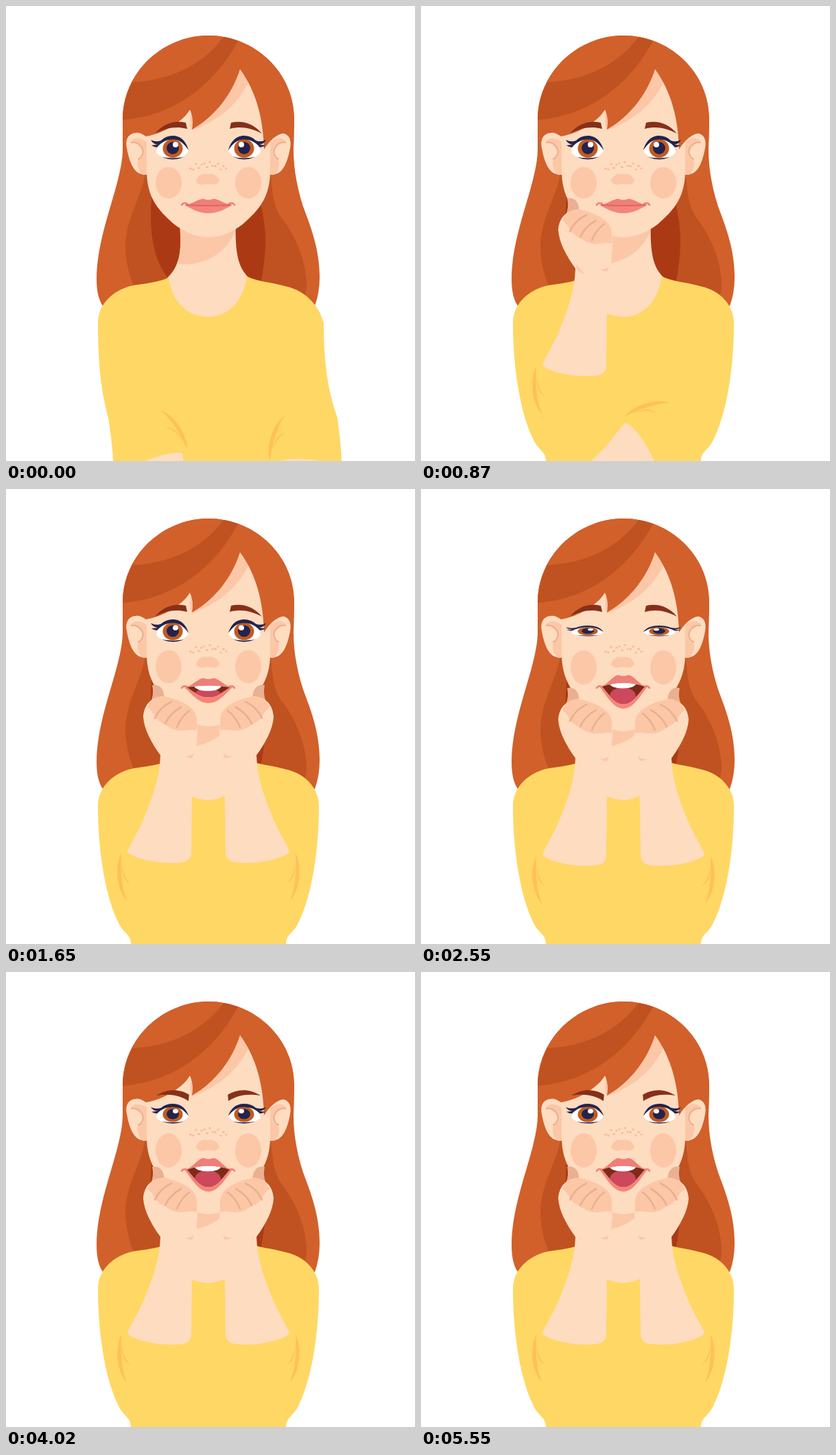
Recreate the animation shown at these times as an HTML page. Size 596 by 663 pixels, loop 6330 ms.

```html
<!DOCTYPE html>
<html lang="en">
<head>
<meta charset="utf-8">
<title>Portrait</title>
<style>
  html, body { margin: 0; width: 100%; height: 100%; overflow: hidden; background: #fff; }
  svg { display: block; width: 100vw; height: 100vh; }
  .hair { fill: #d2602a; }
  .shade { fill: #bf5220; }
  .deep { fill: #ab3a14; }
  .skin { fill: #fddcc0; }
  .blush { fill: #fcc7a7; }
  .knuckle { fill: #e9b091; }
  .cloth { fill: #ffd764; }
  .crease { fill: #ffc05a; }
  .navy { fill: #23234d; }
  .brow { fill: #86301a; }
  .line { fill: none; stroke-linecap: round; }
</style>
</head>
<body>
<svg viewBox="0 0 596 663">
  <defs>
    <g id="ear">
      <path class="skin" d="M208 186C197 184 190 184 184 186C176 189 174 198 176 207C179 224 185 243 198 245Q204 246 208 243Z"/>
      <path class="blush" d="M181 199C187 190 197 192 205 198V246H199C190 236 190 226 196 220C202 213 197 205 190 201Q185 198 181 199Z"/>
      <path class="line" stroke="#e9b091" stroke-width="2" d="M183 199C193 197 202 207 199 216Q197 221 193 223"/>
    </g>
    <g id="eye">
      <path fill="#fff" d="M219 213C222 197 232 191 243 191C256 191 262 202 266 212C259 221 251 222 243 222C232 222 223 220 219 213Z"/>
      <ellipse cx="243" cy="207.500" rx="14.500" ry="13.500" fill="#c05c20"/>
      <circle class="navy" cx="243" cy="207" r="9"/>
      <circle cx="247" cy="202" r="4" fill="#fff"/>
      <path class="navy" d="M211 195Q219 199 226 196Q233 189 243 189C256 189 263 199 266 210C259 200 253 194.500 243 194.500C233 194.500 226 199 220 206Q216 206 212 203L221 202Q214 201 211 195Z"/>
      <path class="navy" d="M227 220Q243 223 259 220Q243 227 227 220Z"/>
    </g>
    <path id="brow" class="brow" d="M217 186C229 171 246 166 262 170L264 179C248 175 234 177 217 186Z"/>
    <g id="arm">
      <path class="crease" d="M168 528C157 553 163 583 176 598C168 578 167 555 168 528ZM169 543C170 560 176 568 182 573C173 569 168 560 169 543Z"/>
      <path class="knuckle" d="M213 284C224 281 232 291 230 304L211 308Q216 296 213 284Z"/>
      <path class="skin" d="M178 528C174 526 190 503 200 480C213 448 224 420 225 386C212 368 201 348 200 330C201 313 211 301 229 300C250 304 274 313 278 333Q280 350 278 364Q278 380 274 390C271 420 271 450 270 528Q270 537 261 541C240 546 195 541 178 528Z"/>
      <path class="blush" d="M206 316C211 305 219 299 231 300C252 305 277 314 278 334V350C267 347 262 351 250 350Q239 347 233 342Q223 338 217 330Q213 321 206 316Z"/>
      <path class="line" stroke="#e9b091" stroke-width="2.600" d="M241 308Q224 316 217 332M255 316Q239 325 232 340M267 321Q255 330 249 345"/>
      <path class="blush" d="M261 387Q268 388 274 383L271 390Q266 391 261 387Z"/>
      <path class="blush fold" d="M226 380Q225 390 238 393Q231 387 226 380Z"/>
    </g>
    <clipPath id="inside"><path id="gap"/></clipPath>
  </defs>

  <path class="hair" d="M295 43C227 43 170 98 170 165V210C169 260 132 330 132 398Q132 424 141 437H450Q457 418 457 395C457 355 444 322 437 303C426 275 419 240 419 210L420 165C420 97 363 43 295 43Z"/>
  <path class="shade" d="M205 230C202 275 174 305 174 352Q175 388 192 420H430Q437 430 438 405C437 368 421 335 404 312C388 292 389 270 385 240Z"/>
  <path class="deep" d="M213 270C208 315 210 370 242 404H371C380 360 381 325 370 285Z"/>

  <path class="skin" d="M252 305C256 340 258 376 235 396L240 455H350L354 396C338 381 333 360 335 305Z"/>
  <path class="blush" d="M252 308C255 335 255 355 251 376C290 380 326 357 335 324V308Z"/>
  <path id="body" class="cloth"/>

  <use href="#ear"/>
  <use href="#ear" transform="matrix(-1 0 0 1 590 0)"/>
  <path id="face" class="skin"/>
  <path class="blush" d="M270 155Q266 170 271 181C316 165 340 138 354 110L341 90Z"/>
  <path class="hair" d="M295 43C227 43 170 98 170 165V188Q188 178 204 190C226 187 257 170 268 151Q274 164 271 180C306 160 330 127 341 92C365 125 375 165 376 209C386 193 399 182 413 186L419 205L420 165C420 97 363 43 295 43Z"/>
  <path class="shade" d="M184 111C240 108 287 86 317 45Q328 47 338 51C298 125 235 161 170 166Q171 136 184 111Z"/>

  <ellipse class="blush cheek" cx="237" rx="19"/>
  <ellipse class="blush cheek" cx="353" rx="19"/>
  <g id="freckles" fill="#f7ba94"></g>
  <path class="blush" d="M277 256C279 247 286 243 294 245C303 243 310 249 311 256C306 262 300 260 294 259C288 261 282 262 277 256Z"/>
  <g class="brows"><use href="#brow"/></g>
  <g transform="matrix(-1 0 0 1 590 0)"><g class="brows"><use href="#brow"/></g></g>
  <g id="eyes">
    <use href="#eye"/>
    <use href="#eye" transform="matrix(-1 0 0 1 590 0)"/>
  </g>

  <path class="line" stroke="#ef8079" stroke-width="2.500" d="M256 290Q258 286 264 288M333 290Q331 286 325 288"/>
  <path id="lower" fill="#f5857a"/>
  <g id="inner" clip-path="url(#inside)">
    <rect x="255" y="270" width="80" height="60" fill="#7f2a19"/>
    <ellipse id="tongue" cx="294" rx="19" fill="#cd485b"/>
    <path id="teeth" fill="#fff"/>
  </g>
  <path id="upper" fill="#ef7f78"/>
  <path id="seam" class="line" stroke="#e0655f"/>

  <g class="arm"><use href="#arm"/></g>
  <g transform="matrix(-1 0 0 1 590 0)"><g class="arm"><use href="#arm"/></g></g>
</svg>
<script>
const LOOP = 6330, STEP = 30;
const $ = s => document.querySelector(s), $$ = s => [...document.querySelectorAll(s)];
const set = (el, attrs) => { for (const k in attrs) el.setAttribute(k, attrs[k]); };
const mix = (a, b, p) => a + (b - a) * p;
const smooth = u => u * u * (3 - 2 * u);
const part = (t, from, to) => Math.min(1, Math.max(0, (t - from) / (to - from)));
const ease = (t, from, to) => smooth(part(t, from, to));
const sin = deg => Math.sin(deg * Math.PI / 180);

// Both arms are described as the left one; the right one is mirrored.
const arms = [
  { turn: t => 152 * (1 - ease(t, 240, 670)), side: t => ease(t, 240, 560),
    drop: 41, shoulder: 134, elbow: 149, hem: 156 },
  { turn: t => 168 * (1 - smooth(part(t, 240, 1260) ** 2)), side: t => ease(t, 240, 840),
    drop: 93, shoulder: 127, elbow: 107, hem: 101 }
];

for (let i = 0; i < 14; i++) {
  const dot = document.createElementNS("http://www.w3.org/2000/svg", "ellipse");
  set(dot, { cx: 269 + 4 * i, cy: 237 - 6 * sin(i * 14) + 4 * sin(i * 138),
    rx: i % 3 ? 1.5 : 2, ry: 1.4 });
  $("#freckles").append(dot);
}

function outline(arm, t, flip) {
  const p = arm.side(t), at = (x, y) => `${flip ? 590 - x : x} ${y}`;
  const s = mix(arm.shoulder, 134, p), e = mix(arm.elbow, 163, p), h = mix(arm.hem, 182, p);
  const y = mix(600, 630, p);
  const pts = [at(s, 462), at(s, 530), at(mix(s, e, .4), y - 35), at(e, y),
    at(mix(e, h, .4), y + 18), at(h, 648), at(h, 663)];
  if (flip) pts.reverse();
  return `${pts[0]}C${pts.slice(1, 4)}C${pts.slice(4)}`;
}

function drawBody(t) {
  set($("#body"), { d: `M237 396C215 405 190 405 178 409C155 416 134 435 ${outline(arms[0], t)}`
    + `L${outline(arms[1], t, true)}C456 435 435 415 410 409C385 402 368 402 351 394`
    + "C345 430 325 453 294 453C263 453 242 430 237 396Z" });
}

function drawArm(el, arm, t, bob) {
  const turn = arm.turn(t);
  const x = 223 + 45 * Math.sqrt(sin(turn)) - arm.drop * (1 - arm.side(t));
  const y = 535 + 136 * sin(turn * .55) ** 1.4 + bob;
  set(el, { transform: `translate(${x} ${y}) rotate(${turn}) translate(-223 -535)` });
}

// A bowl hanging between the mouth corners.
const bowl = (inset, corner, side, bottom, bend) =>
  `M${260 + inset} ${corner}C${270 + inset} ${side} ${280 + inset / 2} ${bottom} 295 ${bottom}`
  + `C${310 - inset / 2} ${bottom} ${320 - inset} ${side} ${330 - inset} ${corner}Q295 ${bend} ${260 + inset} ${corner}Z`;

function drawMouth(o) {
  const c = 290 - 2 * o, top = 281 - 10 * o, mid = 291 - 8.5 * o, bend = 2 * mid - c;
  set($("#upper"), { d: `M260 ${c}C271 ${c - 1} 280 ${top} 288 ${top}Q295 ${top + 3} 302 ${top}`
    + `C310 ${top} 319 ${c - 1} 330 ${c}Q295 ${bend} 260 ${c}Z` });
  set($("#lower"), { d: bowl(0, c, mix(295, 300, o), 302 + 18 * o, bend) });
  set($("#gap"), { d: bowl(4, c, mix(291, 299, o), 291 + 22 * o, bend) });
  set($("#inner"), { opacity: o ? 1 : 0 });
  set($("#teeth"), { d: `M272 ${mid - 3}H315Q314 ${mid + 8} 294 ${mid + 8}Q275 ${mid + 8} 272 ${mid - 3}Z` });
  set($("#tongue"), { cy: 298 + 4 * o, ry: 6 + 7 * o });
  set($("#seam"), { d: `M263 ${c}Q295 ${bend} 327 ${c}`, "stroke-width": 1.8, opacity: 1 - Math.min(1, 4 * o) });
}

function draw(t) {
  const open = ease(t, 1410, 1860), calm = ease(t, 2460, 3090), frown = ease(t, 2490, 3270);
  const blink = t > 3990 && t < 5550 ? sin((t - 3990) / 780 * 180) ** 2 : 0;
  const lids = 1 - .55 * ease(t, 1560, 2040) + .39 * ease(t, 2550, 3180) - .72 * blink;
  const bob = -3.5 + 10 * open - 6.5 * calm, chin = 337 + 16 * open, jaw = 318 + 8 * open;
  drawBody(t);
  drawMouth(open);
  set($("#face"), { d: `M205 180V240C205 282 225 300 245 ${jaw}Q270 ${chin} 295 ${chin}`
    + `Q320 ${chin} 345 ${jaw}C365 300 385 282 385 240V190L376 150L341 85L268 145Z` });
  $$(".cheek").forEach(el => set(el, { cy: 257.5 + 2.5 * open, ry: 23 + 2 * open }));
  $$(".brows").forEach(el => set(el, {
    transform: `translate(${4 * frown} ${2 * frown}) rotate(${18 * frown} 241 176)` }));
  set($("#eyes"), { transform: `translate(0 207) scale(1 ${lids}) translate(0 -207)` });
  $$(".arm").forEach((el, i) => drawArm(el, arms[i], t, bob));
  set($(".fold"), { opacity: arms[1].turn(t) > 10 && arms[0].turn(t) < 90 ? 1 : 0 });
}

const start = performance.now();
function tick() {
  const t = (performance.now() - start) % LOOP;
  draw(Math.floor(t / STEP) * STEP);
  requestAnimationFrame(tick);
}
tick();
</script>
</body>
</html>
```
